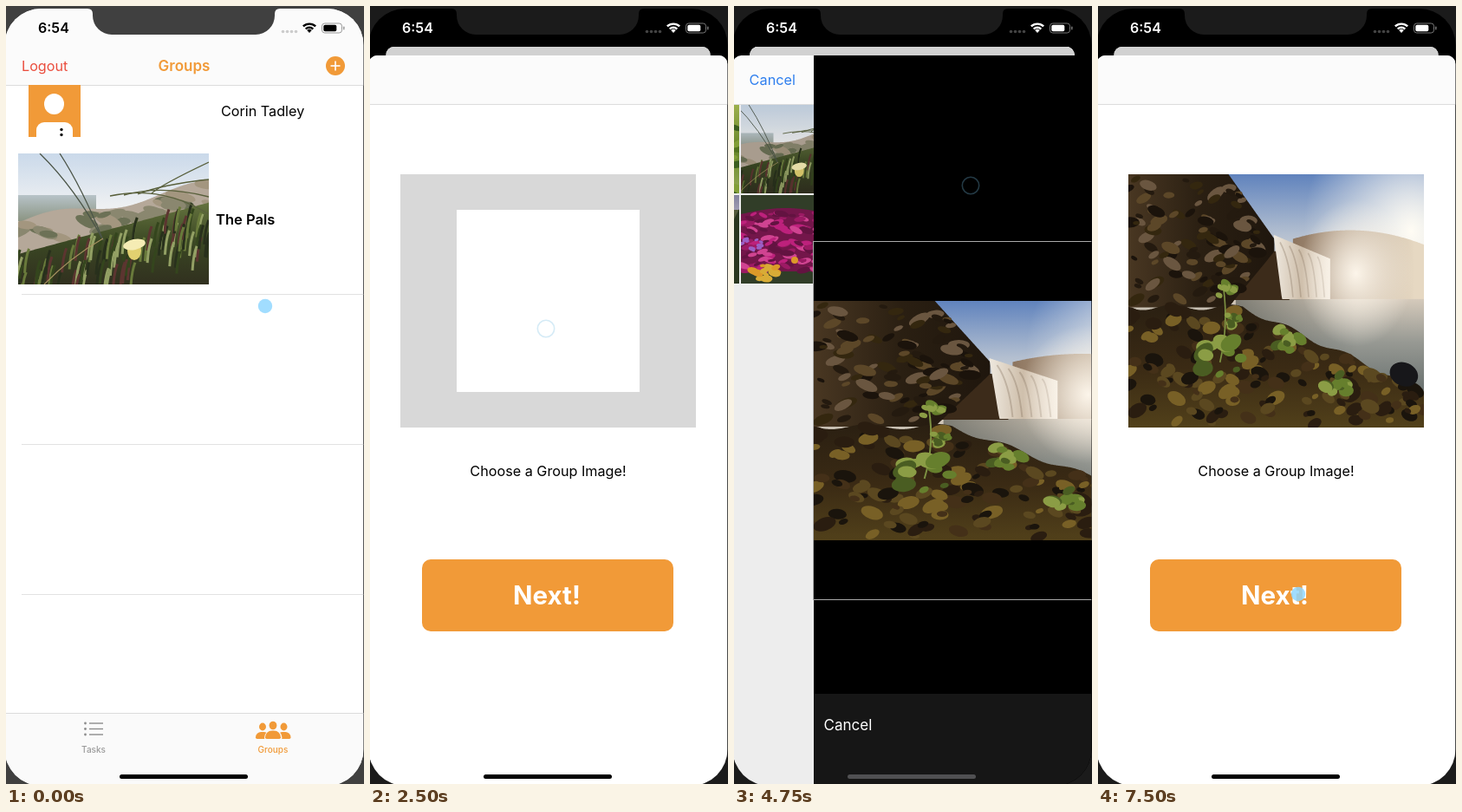
An HTML page with a canvas that plays this animation: 413 px wide and 897 px high, repeating every 8 s.

```html
<!DOCTYPE html>
<html lang="en">
<head>
<meta charset="utf-8">
<title>Group image picker</title>
<style>
html, body { margin: 0; width: 100%; height: 100%; overflow: hidden; background: #1b1b1b; }
canvas { display: block; width: 100vw; height: 100vh; }
</style>
</head>
<body>
<canvas id="stage"></canvas>
<script>
const W = 413, H = 897, LOOP = 8000, STEP = 250;
const PHONE = { x: -1.5, y: 3, w: 414, h: 896 };
const MID = PHONE.x + PHONE.w / 2, SHEET_TOP = 57, BAR_END = 113;
const ORANGE = '#f19a38', BLUE = '#2f7fee', LINE = '#dcdcdc', BAR = '#fbfbfb';
const canvas = document.getElementById('stage');
const g = canvas.getContext('2d');
const ratio = window.devicePixelRatio || 1;
canvas.width = W * ratio;
canvas.height = H * ratio;

const clamp = v => Math.max(0, Math.min(1, v));
const mix = (a, b, u) => a + (b - a) * u;
const easeOut = (t, start, dur = 500) => 1 - (1 - clamp((t - start) / dur)) ** 3;
const times = (n, fn) => { for (let i = 0; i < n; i++) fn(i); };

function seeded(seed) {
  return () => (seed = (seed * 16807) % 2147483647) / 2147483647;
}

function rect(x, y, w, h, fill) {
  g.fillStyle = fill;
  g.fillRect(x, y, w, h);
}

function round(x, y, w, h, r, fill) {
  g.beginPath();
  g.roundRect(x, y, w, h, r);
  g.fillStyle = fill;
  g.fill();
}

function oval(x, y, rx, ry, fill, turn = 0) {
  g.beginPath();
  g.ellipse(x, y, rx, ry, turn, 0, Math.PI * 2);
  g.fillStyle = fill;
  g.fill();
}

function curve(color, width, x0, y0, cx, cy, x1, y1) {
  g.beginPath();
  g.moveTo(x0, y0);
  g.quadraticCurveTo(cx, cy, x1, y1);
  g.strokeStyle = color;
  g.lineWidth = width;
  g.stroke();
}

function text(str, x, y, size, color, weight = 400, align = 'left') {
  g.font = `${weight} ${size}px Inter, "Liberation Sans", sans-serif`;
  g.textAlign = align;
  g.fillStyle = color;
  g.fillText(str, x, y);
}

function stops(grad, colors) {
  colors.forEach((c, i) => grad.addColorStop(i / (colors.length - 1), c));
  return grad;
}
const down = (y0, y1, ...colors) => stops(g.createLinearGradient(0, y0, 0, y1), colors);
const across = (x0, x1, ...colors) => stops(g.createLinearGradient(x0, 0, x1, 0), colors);

function glow(x, y, r, rgb) {
  const fill = stops(g.createRadialGradient(x, y, 0, x, y, r), [`rgba(${rgb},1)`, `rgba(${rgb},0)`]);
  rect(x - r, y - r, 2 * r, 2 * r, fill);
}

function inside(x, y, w, h, r, draw) {
  g.save();
  g.beginPath();
  g.roundRect(x, y, w, h, r);
  g.clip();
  draw();
  g.restore();
}

// Fills between two curves given as functions of x.
function area(fill, x0, x1, top, bottom) {
  g.beginPath();
  for (let x = x0; x <= x1; x++) g.lineTo(x, top(x));
  for (let x = x1; x >= x0; x--) g.lineTo(x, bottom(x));
  g.fillStyle = fill;
  g.fill();
}

// Scatters flat dabs; place(rnd) gives each centre.
function dabs(n, seed, rx, ry, tones, place) {
  const rnd = seeded(seed);
  times(n, i => {
    const [x, y] = place(rnd), s = 0.5 + rnd();
    oval(x, y, rx * s, ry * s, tones[i % tones.length], rnd() - 0.5);
  });
}

function clump(x, y, r, size, tones) {
  dabs(12, x + y, size, size * 0.6, tones, rnd => {
    const a = rnd() * 6.3, d = r * Math.sqrt(rnd());
    return [x + d * Math.cos(a), y + d * 0.7 * Math.sin(a)];
  });
}

// Pictures: each is drawn in its own w by h space.
const meadow = { w: 220, h: 151, draw() {
  const hill = x => 80 - x * 0.2 - 6 * Math.sin(x / 26);
  const grass = x => 116 - x * 0.27;
  rect(0, 0, 220, 151, down(0, 60, '#cad9ea', '#eef0f2'));
  rect(0, 48, 90, 30, down(48, 78, '#b7c3c8', '#8b9482'));
  area('#b5a899', 0, 220, hill, () => 151);
  dabs(30, 9, 13, 5, ['#8a876f', '#a3967f', '#6c7156'], r => {
    const x = r() * 220;
    return [x, mix(hill(x) + 4, grass(x), r())];
  });
  area(down(55, 151, '#66743f', '#3a4723', '#31301f'), 0, 220, grass, () => 151);
  const rnd = seeded(11), tones = ['#34451d', '#697a3b', '#5c3530', '#93a064', '#28301c'];
  times(110, i => {
    const x = rnd() * 220, y = grass(x) - 6 + rnd() * 52;
    curve(tones[i % 5], 3, x - 3, y + 28, x - 2, y + 10, x + 2, y);
  });
  times(2, i => curve('#4c5548', 1.3, 25 + 23 * i, 0, 66 + 8 * i, 40, 98, 100));
  times(4, i => curve('#59603c', 1.3, 106 + 16 * i, 49 - i, 165, 36, 220, 70 - 20 * i));
  curve('#a5915e', 1.2, 30, 151, 60, 120, 98, 98);
  oval(134, 112, 8, 11, '#e2d070');
  oval(134, 105, 13, 6, '#f5ecb4', -0.2);
} };

const falls = { w: 413, h: 276, draw() {
  const cliffTop = x => Math.max(0, x - 140) * 1.1;
  const cliffEnd = x => 145 - Math.max(0, x - 140) * 0.95;
  const shore = x => 145 + Math.max(0, x - 160) * 0.36 + 3 * Math.sin(x / 13);
  const greens = ['#667f2d', '#8b9d45', '#4a5d22'];

  rect(0, 0, 413, 276, down(0, 130, '#6083bd', '#b3bfd0', '#eee4d4'));
  glow(395, 62, 150, '255,252,244');
  area(across(232, 400, '#8e7660', '#e6d8c2'), 230, 413, x => 61 + ((x - 310) / 26) ** 2, () => 137);
  rect(0, 136, 413, 140, down(136, 230, '#d5cabb', '#979993', '#6f7674'));
  rect(150, 136, 170, 60, across(150, 320, 'rgba(70,75,70,.6)', 'rgba(70,75,70,0)'));
  area('#3c2b1a', 148, 225, () => 84, () => 137);
  area(across(0, 204, '#493722', '#2a1f12', '#1f160d'), 0, 204, cliffTop, cliffEnd);
  dabs(110, 31, 9, 4, ['#1b130b', '#5c4728', '#34270f', '#6a5640', '#241a0f'], r => {
    const x = r() * 185;
    return [x, mix(cliffTop(x) + 5, cliffEnd(x) - 5, r())];
  });
  area(across(203, 282, '#efe9df', '#cdbda9', '#f5eee4'), 203, 282,
    x => 66 + (x - 203) * 0.33, x => Math.min(136, 66 + (x - 203) * 6));
  times(5, i => curve('rgba(120,100,82,.3)', 2, 212 + i * 13, 74 + i * 4, 226 + i * 11, 94, 230 + i * 11, 134));
  glow(318, 108, 80, '252,245,234');
  area(down(145, 276, '#2b2012', '#3a2a14', '#51401a'), 0, 413, shore, () => 276);
  dabs(160, 5, 9, 5, ['#1a140c', '#5b4820', '#443018', '#2a1d10', '#786026'], r => {
    const x = r() * 413;
    return [x, mix(shore(x) + 3, 272, r())];
  });
  oval(385, 218, 20, 13, '#17171a', 0.2);
  curve('#7d9142', 2, 128, 205, 140, 165, 133, 124);
  clump(136, 126, 13, 6, greens.slice(0, 2));
  clump(148, 158, 14, 7, greens);
  clump(126, 200, 33, 10, greens);
  clump(222, 179, 20, 7, greens);
  clump(291, 229, 17, 8, greens);
} };

const anywhere = r => [r() * 102, r() * 102];

const leaves = { w: 102, h: 102, draw() {
  rect(0, 0, 102, 102, down(0, 102, '#a8bd52', '#6f8f2c', '#9fb65a'));
  dabs(60, 23, 10, 4, ['#c3d272', '#597c22', '#8caa3b', '#3f6420'], anywhere);
  oval(47, 53, 8, 20, '#cdb238', -0.1);
  curve('#6c4c25', 2, 30, 0, 38, 50, 28, 102);
} };

const rapids = { w: 102, h: 102, draw() {
  rect(0, 0, 102, 102, down(0, 102, '#2b2d2e', '#4b4a36'));
  times(7, i => curve(i % 2 ? '#a9b0b8' : '#dfe3e8', 11, 52 + i * 5, 0, 74 - i * 3, 42, i * 5, 102));
  area('#37361b', 52, 102, x => 48 + 5 * Math.sin(x / 6), () => 102);
  dabs(16, 7, 8, 5, ['#76742c', '#26251a'], r => [60 + r() * 42, 54 + r() * 45]);
} };

const valley = { w: 102, h: 102, draw() {
  rect(0, 0, 102, 102, down(0, 40, '#8d8ba9', '#d6cddb'));
  area(down(18, 102, '#5a613f', '#3a4726'), 0, 102, x => 19 + 2 * Math.sin(x / 9), () => 102);
  area(across(50, 80, '#c4bdcc', '#e5e0e8'), 54, 78, () => 23, x => 94 - (x - 54) * 1.1);
  area('#2b3520', 0, 54, x => 38 + x * 0.8, () => 102);
  area('#2d3a20', 62, 102, x => 112 - (x - 54) * 2, () => 102);
  dabs(20, 13, 9, 3, ['#5f6d3a', '#37472a'], r => [r() * 40, 60 + r() * 42]);
} };

const blooms = { w: 102, h: 102, draw() {
  rect(0, 0, 102, 102, '#35422b');
  area('#7c1850', 0, 102, x => 22 - 7 * Math.sin(x / 33), () => 88);
  dabs(120, 41, 6, 2.5, ['#cb2385', '#a81c6c', '#e0489c', '#6a1446'], r => [r() * 102, 20 + r() * 68]);
  clump(13, 58, 14, 3, ['#a766d4']);
  clump(28, 89, 15, 5, ['#eda52c', '#e8b93a']);
  oval(62, 75, 4, 4, '#eda52c');
} };

function picture(pic, x, y, w, h, cover) {
  inside(x, y, w, h, 0, () => {
    let sx = w / pic.w, sy = h / pic.h;
    if (cover) sx = sy = Math.max(sx, sy);
    g.translate(x + (w - pic.w * sx) / 2, y + (h - pic.h * sy) / 2);
    g.scale(sx, sy);
    pic.draw();
  });
}

function person(x, y, r, w, h) {
  oval(x, y, r, r * 1.1, ORANGE);
  round(x - w / 2, 845 - h, w, h, [h * 0.9, h * 0.9, 2, 2], ORANGE);
}

function groupsPage(t) {
  rect(-2, 0, W + 2, H + 2, '#fff');
  rect(-2, 0, W + 2, 91, BAR);
  rect(-2, 91, W + 2, 1, LINE);
  text('Logout', 18, 75, 16.2, '#ea4d3d');
  text('Groups', MID, 75, 17, ORANGE, 600, 'center');
  oval(380, 69, 11, 11, t >= 1000 && t < 1500 ? '#f9e3c5' : ORANGE);
  rect(374.5, 68.2, 11, 1.6, '#fff');
  rect(379.2, 63.5, 1.6, 11, '#fff');

  rect(26, 91, 60, 60, ORANGE);
  oval(55.5, 113, 11.5, 12, '#fff');
  round(35, 134, 42, 17, [9, 9, 0, 0], '#fff');
  times(2, i => oval(64, 142.5 + 6 * i, 1.7, 1.7, '#111'));
  text('Corin Tadley', 248, 127, 16.2, '#000');
  picture(meadow, 14, 170, 220, 151);
  text('The Pals', 242, 252, 16.5, '#000', 600);
  times(3, i => rect(18, 332 + 173 * i, W, 1, '#e2e2e2'));

  rect(-2, 815, W + 2, 84, '#fafafa');
  rect(-2, 815, W + 2, 1, LINE);
  times(3, i => {
    const y = 827 + 6.5 * i;
    oval(91.5, y, 1.4, 1.4, '#8d8d8d');
    rect(96, y - 0.7, 16, 1.4, '#8d8d8d');
  });
  text('Tasks', 101, 861, 10, '#999', 500, 'center');
  times(2, i => person(296 + 24.5 * i, 831, 4, 16, 8));
  round(298, 834.5, 20.5, 11, [10, 10, 2, 2], '#fafafa');
  person(308, 829.5, 4.4, 18, 9.5);
  text('Groups', 308, 861, 10, ORANGE, 500, 'center');
}

function pageBody(top, fill) {
  rect(-2, top, W + 2, H, fill);
}

function navBar() {
  rect(-2, SHEET_TOP, W + 2, BAR_END - SHEET_TOP, BAR);
  rect(-2, BAR_END, W + 2, 1, LINE);
}

function imagePage(chosen) {
  pageBody(SHEET_TOP, '#fff');
  navBar();
  if (chosen) picture(falls, 35, 194, 341, 292);
  else {
    rect(35, 194, 341, 292, '#d8d8d8');
    rect(100, 235, 211, 210, '#fff');
  }
  text('Choose a Group Image!', MID, 542, 16.2, '#000', 400, 'center');
  round(60, 638, 290, 83, 10, ORANGE);
  text('Next!', 204, 690, 29.5, '#fff', 700, 'center');
}

function albums(selected) {
  pageBody(BAR_END, '#fff');
  [['Moments', meadow], ['All Photos', blooms], ['Camera', valley]].forEach(([name, pic], i) => {
    const y = 117 + i * 89;
    if (i === 1 && selected) rect(0, y, W, 89, '#d4d4d4');
    picture(pic, 16, y + 9, 70, 70, true);
    text(name, 97, y + 45, 16, '#000');
    rect(97, y + 89, W, 1, '#e4e4e4');
  });
}

function photoGrid() {
  pageBody(BAR_END, '#fff');
  [leaves, meadow, falls, rapids, valley, blooms].forEach((pic, i) =>
    picture(pic, (i % 4) * 104, 114 + Math.floor(i / 4) * 104, 102, 102, true));
}

function cropPage() {
  rect(0, SHEET_TOP, W, H, '#000');
  picture(falls, 0, 340, 412, 276);
  g.strokeStyle = '#aaa';
  g.lineWidth = 1;
  g.strokeRect(-0.5, 271.5, 412, 413);
  rect(0, 793, W, 106, '#161616');
  text('Cancel', 11.5, 834.5, 17, '#fff');
  text('Choose', 399, 834.5, 17, '#fff', 400, 'right');
}

function shifted(dx, dy, draw) {
  g.save();
  g.translate(Math.round(dx), Math.round(dy));
  draw();
  g.restore();
}

function pickerBar(pushed) {
  navBar();
  text('Cancel', 392, 91, 16.3, BLUE, 400, 'right');
  g.globalAlpha = 1 - pushed;
  text('Photos', mix(206, 76, pushed), 91, 16.5, '#000', 600, 'center');
  g.globalAlpha = pushed;
  shifted((1 - pushed) * 60, 0, () => {
    g.beginPath();
    g.moveTo(21, 76);
    g.lineTo(12, 85.5);
    g.lineTo(21, 95);
    g.strokeStyle = BLUE;
    g.lineWidth = 2.6;
    g.stroke();
    text('Photos', 29, 91, 16.3, BLUE);
  });
  text('All Photos', mix(356, 206.5, pushed), 91, 16.5, '#000', 600, 'center');
  g.globalAlpha = 1;
}

const dim = a => rect(-W, 0, 3 * W, H + 2, `rgba(0,0,0,${a})`);

// Slides the next page over the last one, which drifts left and darkens.
function push(p, last, next) {
  if (p < 1) shifted(-0.3 * W * p, 0, () => { last(); dim(0.09 * p); });
  if (p > 0) shifted(W * (1 - p), 0, next);
}

function picker(t) {
  const open = easeOut(t, 3386), crop = easeOut(t, 4553);
  push(crop, () => push(open, () => albums(t >= 3250), photoGrid), () => {});
  shifted(-W * crop, 0, () => pickerBar(open));
  if (crop > 0) shifted(W * (1 - crop), 0, cropPage);
}

// Shrinks a page back into a dimmed card as p goes to 1.
function card(top, p, draw) {
  const s = mix(1, 374 / PHONE.w, p);
  g.save();
  g.translate(MID * (1 - s), mix(top, 47, p));
  g.scale(s, s);
  g.translate(0, -top);
  inside(PHONE.x, top, PHONE.w, PHONE.h, p > 0 || top > PHONE.y ? 10 : 0, () => {
    draw();
    if (p > 0) dim(0.17 * p);
  });
  g.restore();
}

const sheet = (p, draw) => p > 0 && shifted(0, 842 * (1 - p), draw);

function statusBar(light) {
  const ink = light ? '#fff' : '#000', rim = light ? '#777' : '#999';
  text('6:54', 37, 31, 16, ink, 600);
  times(4, i => oval(319.5 + i * 5, 29.5, 1.8, 1.8, light ? '#444' : '#ccc'));
  times(3, i => {
    g.beginPath();
    g.arc(350, 31, 2 + 4.2 * i, -2.33, -0.81);
    g.strokeStyle = ink;
    g.lineWidth = i ? 2.4 : 4;
    g.stroke();
  });
  g.beginPath();
  g.roundRect(364.5, 20, 23, 11, 3.2);
  g.strokeStyle = rim;
  g.lineWidth = 1;
  g.stroke();
  round(366.3, 21.8, 15, 7.4, 1.8, ink);
  round(389, 23.5, 1.5, 4, 1, rim);
}

function notch(fill) {
  g.beginPath();
  g.moveTo(94, 0);
  g.lineTo(94, 3);
  g.quadraticCurveTo(100, 3, 100, 9);
  g.arcTo(100, 33, 124, 33, 22);
  g.arcTo(310, 33, 310, 9, 22);
  g.lineTo(310, 9);
  g.quadraticCurveTo(310, 3, 316, 3);
  g.lineTo(316, 0);
  g.fillStyle = fill;
  g.fill();
}

// Click time and place; the dot glides there beforehand.
const taps = [[-500, 299, 346], [1250, 374, 97], [2500, 203, 372], [3500, 214, 291],
  [4750, 273, 207], [6250, 366, 850], [7750, 231, 678]];

function pointer(t) {
  const i = taps.findIndex(([at]) => t < at + STEP && at > 0);
  if (i < 0) return;
  const [at, x, y] = taps[i], [, px, py] = taps[i - 1];
  if (t >= at) {
    g.beginPath();
    g.arc(x, y, 9.7, 0, Math.PI * 2);
    g.strokeStyle = 'rgba(115,190,225,.3)';
    g.lineWidth = 1.6;
    g.stroke();
  } else if (i === 1 || t >= at - 750) {
    const u = clamp((t - at + 750) / 500);
    oval(mix(px, x, u), mix(py, y, u), 8.2, 8.2, 'rgba(145,215,255,.85)');
  }
}

function draw(t) {
  const shell = t < 500 ? '#404040' : '#1b1b1b';
  const first = easeOut(t, 1380);
  const second = easeOut(t, 2620) * (1 - easeOut(t, 6380));
  g.setTransform(ratio, 0, 0, ratio, 0, 0);
  rect(0, 0, W, H, shell);
  inside(PHONE.x, PHONE.y, PHONE.w, PHONE.h, 42, () => {
    rect(0, 0, W, H, '#000');
    card(PHONE.y, first, () => groupsPage(t));
    sheet(first, () => card(SHEET_TOP, second, () => imagePage(t >= 6500)));
    sheet(second, () => card(SHEET_TOP, 0, () => picker(t)));
    statusBar(first > 0);
    round(131, 886, 148, 5, 2.5, t >= 4750 && second > 0.5 ? '#505052' : '#000');
  });
  notch(shell);
  pointer(t);
}

let shown = -1;
function tick(now) {
  const t = Math.floor((now % LOOP) / STEP) * STEP;
  if (t !== shown) draw(shown = t);
  requestAnimationFrame(tick);
}
requestAnimationFrame(tick);
</script>
</body>
</html>
```
